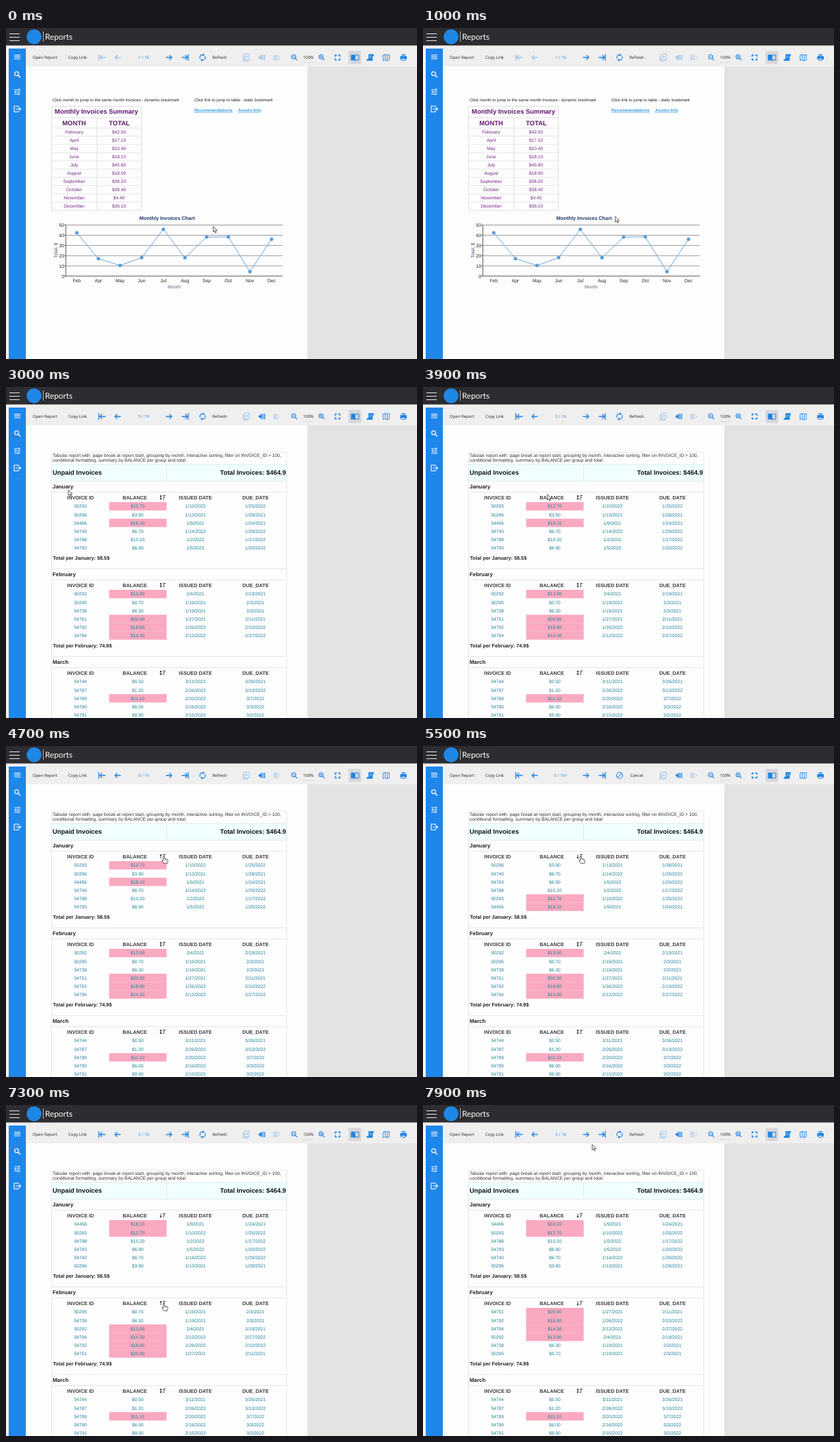
Write an HTML page that moves like this. It is 600x483 px and loops after 8 s.

```html
<!DOCTYPE html>
<html lang="en">
<head>
<meta charset="utf-8">
<title>Reports</title>
<style>
  html, body { margin: 0; width: 100%; height: 100%; overflow: hidden; background: #fefdfe; }
  svg { display: block; width: 100%; height: 100%; }
  text { font-family: "Liberation Sans", Arial, sans-serif; text-rendering: geometricPrecision; white-space: pre; }
  .ui { font-family: "Open Sans", "Noto Sans", sans-serif; }
</style>
</head>
<body>
<svg id="stage" viewBox="0 0 600 483"></svg>
<script>
const NS = "http://www.w3.org/2000/svg";
const stage = document.getElementById("stage");
const BLUE = "#1e84e4", PALE = "#9cc4e8", TEAL = "#1b8496", RULE = "#e4e3e5";
const PURPLE = "#5f1a6e", PINK = "#f9a9c0", INK = "#222";

function add(parent, tag, attrs = {}, content) {
  const node = document.createElementNS(NS, tag);
  for (const name in attrs) node.setAttribute(name, attrs[name]);
  if (content !== undefined) node.textContent = content;
  parent.append(node);
  return node;
}
const group = (parent, attrs) => add(parent, "g", attrs);
const rect = (parent, x, y, width, height, fill) => add(parent, "rect", { x, y, width, height, fill });
const path = (parent, d, stroke, width = 1, fill = "none") =>
  add(parent, "path", { d, stroke, "stroke-width": width, fill });
const circle = (parent, cx, cy, r, attrs) => add(parent, "circle", { cx, cy, r, ...attrs });
const text = (parent, x, y, size, fill, content, attrs = {}) =>
  add(parent, "text", { x, y, "font-size": size, fill, ...attrs }, content);
const BOLD = { "font-weight": 700 };
const MID = { "text-anchor": "middle" };
const END = { "text-anchor": "end" };
const UI = { class: "ui" };
const show = (node, on) => node.setAttribute("visibility", on ? "visible" : "hidden");

// Backgrounds
rect(stage, 0, 0, 600, 483, "#fefdfe");
rect(stage, 440, 56, 160, 427, "#e4e2e3");
rect(stage, 0, 25, 600, 31, "#f0eff0");
rect(stage, 0, 0, 600, 25.5, "#2d2c30");

// Title bar
path(stage, "M5 8.5H20M5 13.5H20M5 18.5H20", "#e8e8e8", 1);
circle(stage, 41, 12.8, 10.8, { fill: "#1f87e5" });
path(stage, "M54.5 5V20", "#d8d8d8", 0.8);
text(stage, 57, 17, 11.8, "#fff", "Reports", { "font-family": "Lato, sans-serif", style: "font-family:Lato,sans-serif" });

// Side bar
rect(stage, 0, 30, 4, 453, "#f6f5f6");
rect(stage, 4, 30, 25, 453, "#1f86ea");
path(stage, "M12 39.5H21M12 42.2H21M12 45H21", "#fff", 1.2);
path(stage, "M17.8 69L21 72.2", "#fff", 1.4);
circle(stage, 15.5, 66.7, 2.9, { fill: "none", stroke: "#fff", "stroke-width": 1.2 });
path(stage, "M12 90H17M19 90H21M18.5 88.3V91.7M12 93.2H14M16 93.2H21M14.5 91.5V95M12 96.5H16M18 96.5H21M17.5 94.8V98.2", "#fff", 1.1);
path(stage, "M18 116V114H12V122.5H18V120.5M14.5 118.2H21.5M19.3 116L21.5 118.2L19.3 120.4", "#fff", 1.1);

// Toolbar
text(stage, 39, 45.4, 6, INK, "Open Report", UI);
text(stage, 91, 45.4, 6, INK, "Copy Link", UI);
const pageLabel = text(stage, 201, 45.4, 6.1, BLUE, "", { ...UI, ...MID });
const refreshLabel = text(stage, 312, 45.4, 6, INK, "", { ...UI, ...MID });
text(stage, 441.4, 45.4, 6, INK, "100%", { ...UI, ...MID });
path(stage, "M434 50.3H449", "#999", 0.6).setAttribute("stroke-dasharray", "1 1");

const leftArrow = x => `M${x + 4.5} 43H${x - 4}M${x - 0.5} 39.5L${x - 4} 43L${x - 0.5} 46.5`;
const rightArrow = x => `M${x - 4.5} 43H${x + 4}M${x + 0.5} 39.5L${x + 4} 43L${x + 0.5} 46.5`;
const backButtons = [
  path(stage, leftArrow(141) + "M135.5 38V48", PALE, 1.3),
  path(stage, leftArrow(163), PALE, 1.3)
];
path(stage, rightArrow(238), BLUE, 1.3);
path(stage, rightArrow(261) + "M266 38V48", BLUE, 1.3);

const refreshIcon = group(stage);
path(refreshIcon, "M283.6 45A3.7 3.7 0 0 1 287 39.2H288.3M290.4 41A3.7 3.7 0 0 1 287 46.8H285.8", BLUE, 1.2);
path(refreshIcon, "M287.5 37L290 39.2L287.5 41.4ZM286.5 44.6L284 46.8L286.5 49Z", "none", 0, BLUE);
const cancelIcon = group(stage);
circle(cancelIcon, 287, 43, 4.5, { fill: "none", stroke: BLUE, "stroke-width": 1.1 });
path(cancelIcon, "M283.9 46.1L290.1 39.9", BLUE, 1.1);

path(stage, "M346.3 40V48.3H353.5M348 38H355V46.5H348ZM350 42.2H353M351.5 40.7V43.8", PALE, 1);
const historyBack = path(stage, "M373.3 39V47L368 43ZM374.3 39H375.6V47H374.3ZM376.8 39H378.2V47H376.8Z", "none", 0, PALE);
path(stage, "M395.7 39.3V46.7L400.3 43ZM390.8 39.3H391.8V46.7H390.8ZM393 39.3H394V46.7H393Z", PALE, 0.6);

for (const [x, sign] of [[420, "M418.6 42H421.4"], [460, "M458.6 42H461.4M460 40.6V43.4"]]) {
  circle(stage, x, 42, 3, { fill: "none", stroke: BLUE, "stroke-width": 1.1 });
  path(stage, `M${x + 2.2} 44.2L${x + 5.2} 47.2` + sign, BLUE, 1.1);
}
path(stage, "M480.5 42V39.5H483M485 39.5H487.5V42M487.5 44V46.5H485M483 46.5H480.5V44", BLUE, 1.3);
rect(stage, 500, 33.5, 18.5, 19, "#d8d7d9");
path(stage, "M504 39.5Q507 38.5 509.5 40V47.5Q507 46 504 47Z", BLUE, 1, BLUE);
path(stage, "M509.5 40Q512 38.5 515 39.5V47Q512 46 509.5 47.5", BLUE, 1);
path(stage, "M529.5 38.5H536.5V41H535V47.5H527V45.5H529.5Z", BLUE, 0.6, BLUE);
path(stage, "M531 41H533.5M531 43H533.5", "#f0eff0", 0.7);
path(stage, "M550.5 39.5L553.5 38.5L556.5 39.8L559.5 38.5V46.5L556.5 47.8L553.5 46.5L550.5 47.5ZM553.5 38.5V46.5M556.5 39.8V47.8", BLUE, 0.9);
path(stage, "M577.5 38.5H583V40.3H577.5ZM575.5 41H585V46H583V44H577.5V46H575.5Z", "none", 0, BLUE);
path(stage, "M578 44.6H582.5V47.3H578Z", BLUE, 0.9);

// Summary page
const summary = group(stage);
text(summary, 68, 106.5, 6.05, INK, "Click month to jump to the same month Invoices - dynamic bookmark");
text(summary, 275, 106.5, 6.05, INK, "Click link to jump to table - static bookmark");
for (const [x, width, label] of [[275, 56, "Recommendations"], [339, 33, "Assets Info"]]) {
  text(summary, x, 121.8, 6.22, "#3d9fe6", label, BOLD);
  path(summary, `M${x} 123.2h${width}`, "#3d9fe6", 0.7);
}

const months = [
  ["February", 42.5], ["April", 17.1], ["May", 10.4], ["June", 18.1], ["July", 45.8],
  ["August", 18], ["September", 38.2], ["October", 38.4], ["November", 4.4], ["December", 36.1]
];
const money = value => "$" + value.toFixed(2);
text(summary, 132, 125.2, 9.42, PURPLE, "Monthly Invoices Summary", { ...BOLD, ...MID });
text(summary, 99.5, 142, 9.4, PURPLE, "MONTH", { ...BOLD, ...MID });
text(summary, 165.5, 142, 9.4, PURPLE, "TOTAL", { ...BOLD, ...MID });
path(summary, "M66.5 114.5H197.5V266H66.5ZM66.5 131H197.5M133 131V266", "#d9d6db", 0.8);
months.forEach(([name, total], i) => {
  const y = 146 + 12 * i;
  path(summary, `M66.5 ${y}H197.5`, "#dfdce1", 0.8);
  text(summary, 99.5, y + 8.3, 6.6, "#6f2a80", name, MID);
  text(summary, 165, y + 8.3, 6.6, "#6f2a80", money(total), MID);
});

text(summary, 235.3, 280.2, 7.36, "#1d3a66", "Monthly Invoices Chart", { ...BOLD, ...MID });
const chartX = i => 103.3 + 31.6 * i, chartY = value => 362 - 1.49 * value;
for (let value = 0; value <= 50; value += 10) {
  const y = chartY(value);
  path(summary, `M84.5 ${y}H404`, value ? "#8f8f93" : "#444", 0.9);
  text(summary, 85, y + 2.5, 6.9, INK, value, END);
}
path(summary, "M87.3 287V362", "#444", 0.9);
path(summary, "M" + months.map(([, total], i) => `${chartX(i)} ${chartY(total)}`).join("L"), "#6aa5d8", 1);
months.forEach(([name, total], i) => {
  circle(summary, chartX(i), chartY(total), 2.5, { fill: "#559bd6" });
  text(summary, chartX(i), 370.6, 6.8, INK, name.slice(0, 3), MID);
});
text(summary, 245.5, 380, 6.8, "#5b6b80", "Month", MID);
text(summary, 0, 0, 6.8, "#3f4f66", "Total, $", { ...MID, transform: "translate(74.5 324.5) rotate(-90)" });

// Invoice page
const invoices = group(stage);
text(invoices, 68, 102.4, 6.67, "#333", "Tabular report with: page break at report start, grouping by month, interactive sorting, filter on INVOICE_ID > 100,");
text(invoices, 68, 109.4, 6.67, "#333", "conditional formatting, summary by BALANCE per group and total");
rect(invoices, 66.5, 113, 343.5, 24, "#f0ffff");
path(invoices, "M66.5 483V95H409.8V483M66.5 113H409.8M66.5 137.3H409.8M234.5 113V137", "#dde3e4", 0.8);
text(invoices, 68, 128, 9.38, "#111", "Unpaid Invoices", BOLD);
text(invoices, 408.7, 128, 9.38, "#111", "Total Invoices: $464.9", { ...BOLD, ...END });

const ledger = [
  ["January", "58.5$", [
    "50293 12.70 1/10/2022 1/25/2022", "50296 3.90 1/13/2021 1/28/2021",
    "54456 18.10 1/9/2021 1/24/2021", "54740 6.70 1/14/2022 1/29/2022",
    "54788 10.20 1/2/2022 1/17/2022", "54793 6.90 1/5/2022 1/20/2022"]],
  ["February", "74.9$", [
    "50292 13.90 2/4/2021 2/19/2021", "50295 0.70 1/19/2021 2/3/2021",
    "54738 6.30 1/19/2021 2/3/2021", "54751 20.90 1/27/2021 2/11/2021",
    "54792 18.80 1/26/2022 2/10/2022", "54794 14.30 2/12/2022 2/27/2022"]],
  ["March", "", [
    "54744 0.50 3/11/2021 3/26/2021", "54787 1.20 2/26/2022 3/13/2022",
    "54789 11.10 2/20/2022 3/7/2022", "54790 6.00 2/16/2022 3/3/2022",
    "54791 9.90 2/15/2022 3/2/2022"]]
];
const columns = [[108.7, "INVOICE ID"], [188, "BALANCE"], [276.5, "ISSUED DATE"], [364.3, "DUE_DATE"]];
const cellX = [108.7, 192.3, 276.5, 364];

function buildSection([name, total, lines], index) {
  const g = group(invoices, { transform: `translate(0 ${128 * index})` });
  if (index) path(g, "M66.5 137.3H409.8", RULE, 0.9);
  path(g, "M66.5 153.5H409.8", RULE, 0.9);
  text(g, 68, 147.6, 7.9, "#222", name, BOLD);
  for (const [x, label] of columns) text(g, x, 163.7, 7.28, "#3c3c40", label, { ...BOLD, ...MID });
  path(g, "M229 158.6H233M229 161H232M229 163.4H231", "#333", 1);
  path(g, "M226 158.5V164", "#333", 0.9);
  const up = path(g, "M224.3 160L226 157.6L227.7 160Z", "none", 0, "#333");
  const down = path(g, "M224.3 162.3L226 164.7L227.7 162.3Z", "none", 0, "#333");
  const rows = lines.map((_, i) => {
    const y = 168 + 12.1 * i;
    return {
      mark: rect(g, 150.5, y, 84, 12.2, PINK),
      cells: cellX.map(x => text(g, x, y + 8.4, 6.7, TEAL, "", MID))
    };
  });
  if (total) text(g, 68.4, 252.4, 7.29, "#222", `Total per ${name}: ${total}`, BOLD);
  return { rows, up, down, data: lines.map(line => line.split(" ")) };
}
const sections = ledger.map(buildSection);

function sortSection({ rows, up, down, data }, direction, arrow) {
  const ordered = direction ? [...data].sort((a, b) => direction * (a[1] - b[1])) : data;
  ordered.forEach((record, i) => {
    const large = record[1] > 10.2;
    rows[i].mark.setAttribute("fill", large ? PINK : "none");
    rows[i].cells.forEach((cell, c) => {
      cell.textContent = c === 1 ? money(+record[c]) : record[c];
    });
  });
  up.setAttribute("opacity", arrow >= 0 ? 1 : 0);
  down.setAttribute("opacity", arrow <= 0 ? 1 : 0);
}

// Pointers, each with its hot spot at the group's own zero point
const arrowPointer = group(stage);
path(arrowPointer, "M0 0V8.2L1.9 6.4L3.2 9.3L4.6 8.7L3.3 5.9H5.8Z", "#333", 0.8, "#fff");
const handPointer = group(stage);
path(handPointer, "M-1 1Q0 -.6 1 1V4.2L5 5Q6 5.4 5.8 6.8L5 10.8H0L-3 7Q-3 5.6 -1 6.8Z", "#333", 0.8, "#fff");
path(handPointer, "M2.4 4.5V6M3.9 4.8V6.2", "#333", 0.5);

// Pointer stops: time, x, y
const route = [
  [0, 302.5, 289.5], [800, 302.5, 289.5], [1800, 95, 151.5], [2500, 95, 151.5],
  [2700, 91, 150], [3300, 91, 150], [4300, 230.5, 160.5], [5700, 230.5, 160.5],
  [6100, 230.5, 289.5], [7550, 230.5, 289.5], [7850, 247, 57.5], [8000, 247, 57.5]
];
const PAGE_JUMP = 2500;
const handSpans = [[1650, 2500], [4150, 5750], [6050, 7600]];
const loadSpans = [[4750, 5000], [5400, 5650], [6250, 6500], [7300.5, 7500]].map(([a, b], i) => i === 3 ? [7350, b] : [a, b]);
// Per section: clicks change the arrow first, the rows follow once loaded
const sortTimes = [
  { arrowUp: 4600, rowsUp: 5000, arrowDown: 5400, rowsDown: 5650 },
  { arrowUp: 6200, rowsUp: 6500, arrowDown: 7350, rowsDown: 7500 }
];
const within = (spans, t) => spans.some(([a, b]) => t >= a && t < b);
const phase = (t, up, down) => t >= down ? -1 : t >= up ? 1 : 0;

function pointerAt(t) {
  const i = route.findIndex(stop => stop[0] > t);
  const [t0, x0, y0] = route[i - 1], [t1, x1, y1] = route[i];
  const p = (t - t0) / (t1 - t0), eased = p * p * (3 - 2 * p);
  return [x0 + (x1 - x0) * eased, y0 + (y1 - y0) * eased];
}

function render(t) {
  const onInvoices = t >= PAGE_JUMP, loading = within(loadSpans, t), hand = within(handSpans, t);
  show(summary, !onInvoices);
  show(invoices, onInvoices);
  backButtons.forEach(button => button.setAttribute("stroke", onInvoices ? BLUE : PALE));
  historyBack.setAttribute("fill", onInvoices ? BLUE : PALE);
  pageLabel.textContent = (onInvoices ? "3 / 16" : "1 / 16") + (loading ? "+" : "");
  refreshLabel.textContent = loading ? "Cancel" : "Refresh";
  show(refreshIcon, !loading);
  show(cancelIcon, loading);
  sections.forEach((section, i) => {
    const times = sortTimes[i];
    if (times) sortSection(section, phase(t, times.rowsUp, times.rowsDown), phase(t, times.arrowUp, times.arrowDown));
    else sortSection(section, 0, 0);
  });
  const [x, y] = pointerAt(t);
  for (const pointer of [arrowPointer, handPointer]) pointer.setAttribute("transform", `translate(${x} ${y})`);
  show(arrowPointer, !hand);
  show(handPointer, hand);
}

const start = performance.now();
function tick() {
  render((performance.now() - start) % 8000);
  requestAnimationFrame(tick);
}
tick();
</script>
</body>
</html>
```
